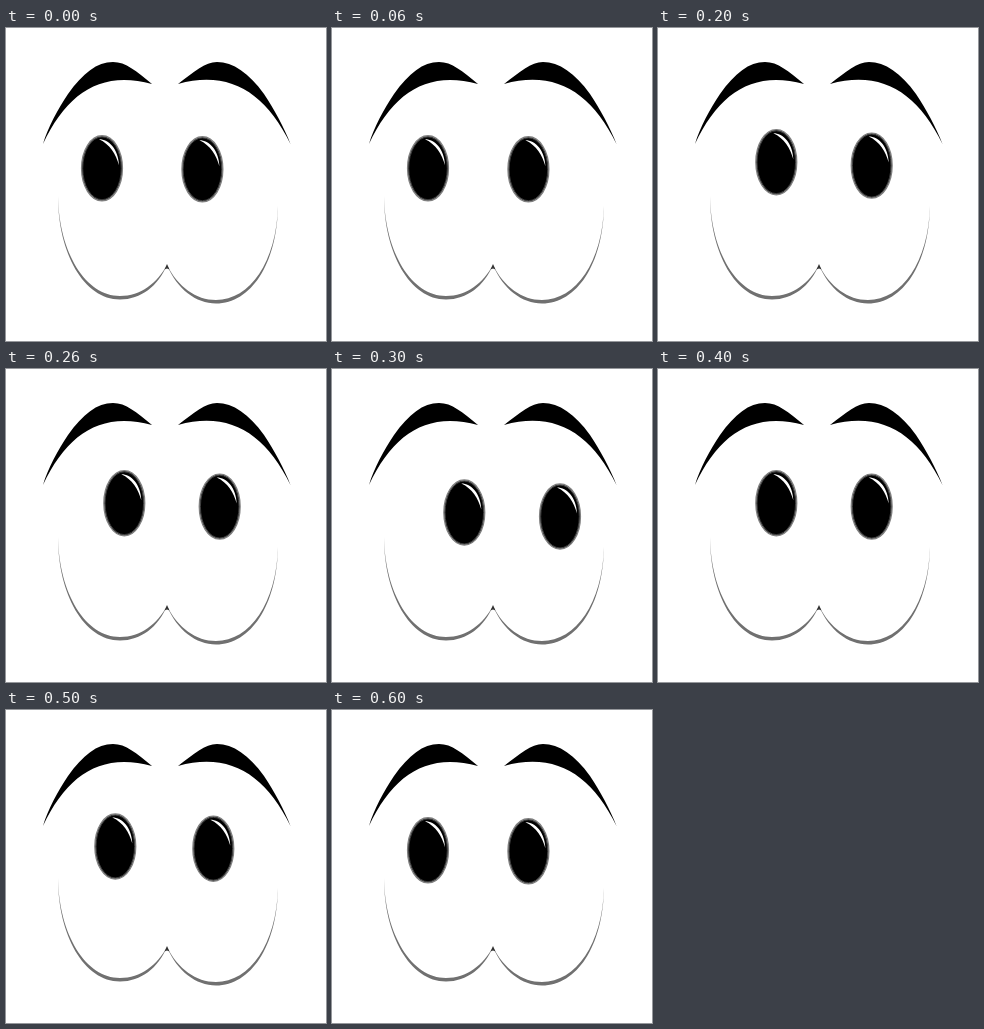
An HTML page that plays this animation: 320x313 px, repeating every 700 ms.

```html
<!DOCTYPE html>
<html lang="en">
<head>
<meta charset="utf-8">
<title>Looking eyes</title>
<style>
  html, body { margin: 0; width: 100%; height: 100%; overflow: hidden; background: #fff; }
  svg { display: block; width: 100vw; height: 100vh; }
</style>
</head>
<body>
<svg viewBox="0 0 320 313">
  <defs>
    <g id="pupil">
      <ellipse rx="20.3" ry="32.4" fill="#000" stroke="#808080" stroke-width="1.6"/>
      <ellipse rx="19.3" ry="31.4" fill="#000" stroke="#484848" stroke-width="0.9"/>
      <path d="M-3 -29 C7 -29 16.5 -19 17 -3 C14 -14 8 -24 -3 -29Z" fill="#fff"/>
    </g>
  </defs>
  <g id="brows">
    <path d="M37 116 C42 99 52 81 62 66 C77 45 91 34 107 34 C120 34 130 43 146 56 C95 42 61 65 37 116Z"/>
    <path d="M172 56 C188 44 199 34 211 34 C227 34 243 45 258 66 C268 81 278 99 284.5 116 C259 64 223 42 172 56Z"/>
  </g>
  <g id="rims" fill="#707070">
    <path d="M52 168 C52 225 78 271.5 114 271.5 C135 271.5 152 258 161 237 C151 255 135 268 114 268 C80 268 53 225 52 168Z"/>
    <path d="M161 237 C171 261 190 275.5 210 275.5 C245 275.5 271 236 272 178 C270.5 234 244 272 210 272 C190 272 172 259 161 237Z"/>
    <path d="M161 236 L158.5 241.5 L161 240.5 L163.5 241.5Z" fill="#333"/>
  </g>
  <use id="left" href="#pupil"/>
  <use id="right" href="#pupil"/>
</svg>
<script>
  const STEP = 100, STEPS = 7;
  // Pupil centres from the far left glance to the far right one.
  const gaze = [
    { left: [96, 140.3], right: [196.4, 141.3] },
    { left: [109.3, 136.5], right: [207.3, 138.7] },
    { left: [118.3, 134.2], right: [213.7, 137.6] },
    { left: [132.3, 143.5], right: [228, 147.5] }
  ];
  const eyes = ["left", "right"].map(id => document.getElementById(id));

  function render(time) {
    const step = Math.floor(time / STEP) % STEPS;
    const pose = gaze[Math.min(step, STEPS - 1 - step)];
    for (const eye of eyes) eye.setAttribute("transform", `translate(${pose[eye.id]})`);
  }

  const start = performance.now();
  function tick() {
    render(performance.now() - start);
    requestAnimationFrame(tick);
  }
  tick();
</script>
</body>
</html>
```
